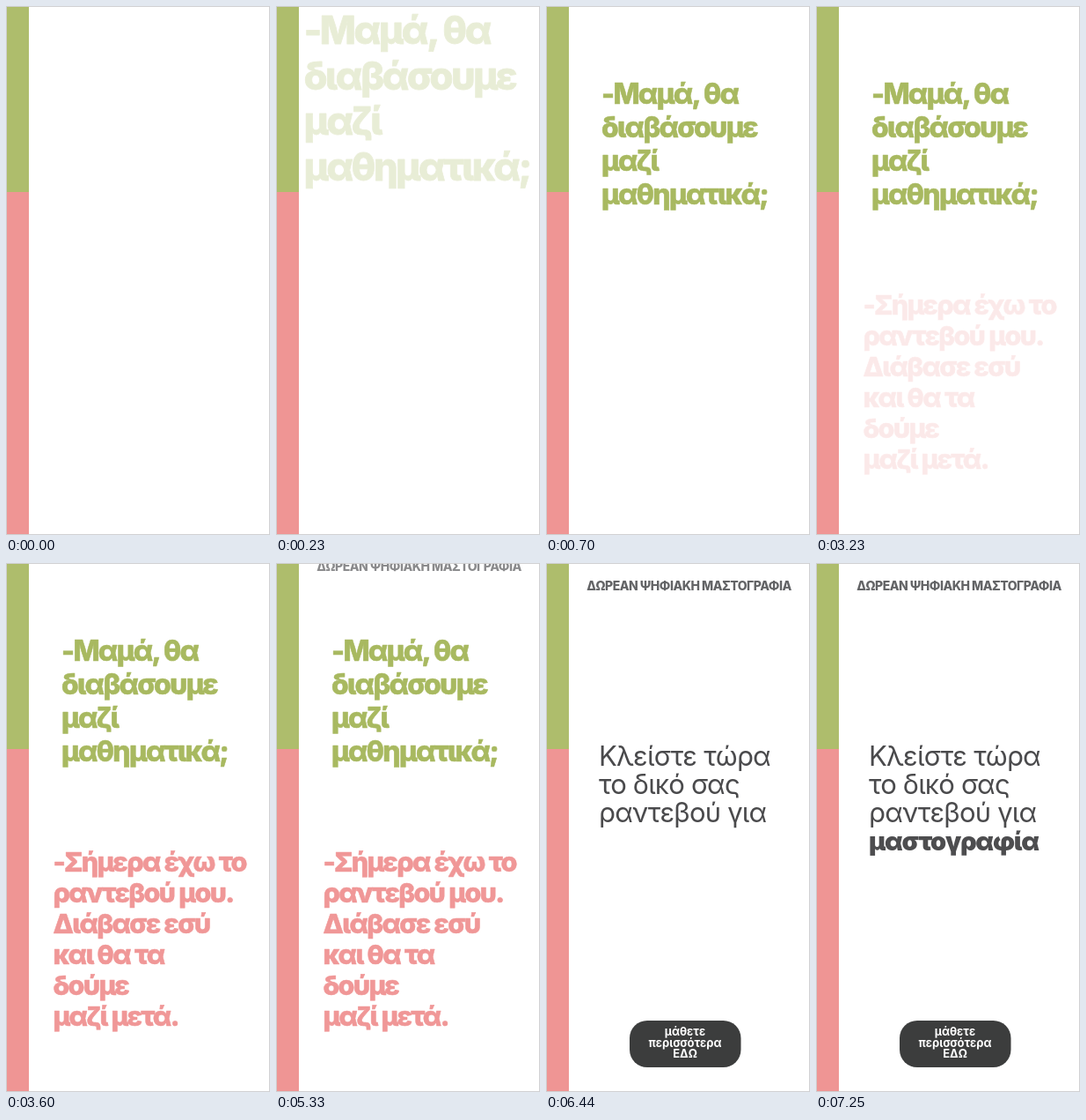
An HTML page that plays this animation: 300 by 600 pixels, repeating every 8000 ms.

```html
<!DOCTYPE html>
<html lang="el">
<head>
<meta charset="utf-8">
<title>Ψηφιακή μαστογραφία</title>
<style>
  html, body { margin: 0; width: 100%; height: 100%; overflow: hidden; background: #fff; }
  svg { display: block; width: 300px; height: 600px; font-family: Inter, "Open Sans", sans-serif; }
  #question, #answer { font-weight: 800; stroke-width: .6px; stroke-linejoin: round; }
  #question { font-size: 32px; letter-spacing: -1.7px; fill: #a8b960; stroke: #a8b960; }
  #answer { font-size: 30.5px; letter-spacing: -1.65px; fill: #f09797; stroke: #f09797; }
  #title { font-size: 14px; font-weight: 800; letter-spacing: -.5px; fill: #636466; text-anchor: middle; }
  #button text { font-size: 13px; font-weight: 700; fill: #fff; text-anchor: middle; }
  .light { font-size: 31px; font-weight: 400; letter-spacing: -.8px; fill: #4a4a4c; }
  .heavy { font-size: 29px; font-weight: 900; letter-spacing: -1.3px; fill: #4d4d4f; }
</style>
</head>
<body>
<svg viewBox="0 0 300 600">
  <rect width="300" height="600" fill="#fff"/>
  <rect width="26" height="211" fill="#aebd6c"/>
  <rect y="211" width="26" height="389" fill="#ef9594"/>

  <g id="question">
    <text x="63" y="111">-Μαμά, θα</text>
    <text x="63" y="149">διαβάσουμε</text>
    <text x="63" y="187">μαζί</text>
    <text x="63" y="225">μαθηματικά;</text>
  </g>

  <g id="answer">
    <text x="53.5" y="350">-Σήμερα έχω το</text>
    <text x="53.5" y="385">ραντεβού μου.</text>
    <text x="53.5" y="420">Διάβασε εσύ</text>
    <text x="53.5" y="455">και θα τα</text>
    <text x="53.5" y="490">δούμε</text>
    <text x="53.5" y="525">μαζί μετά.</text>
  </g>

  <text id="title" x="162.5" y="31">ΔΩΡΕΑΝ ΨΗΦΙΑΚΗ ΜΑΣΤΟΓΡΑΦΙΑ</text>

  <text id="line1" class="light" x="60" y="229.5">Κλείστε τώρα</text>
  <text id="line2" class="light" x="60" y="262">το δικό σας</text>
  <text id="line3" class="light" x="60" y="294">ραντεβού για</text>
  <text id="line4" class="heavy" x="60" y="326">μαστογραφία</text>

  <g id="button">
    <rect x="95" y="519" width="126.5" height="53" rx="20" fill="#3c3d3d"/>
    <text x="158" y="536">μάθετε</text>
    <text x="158" y="548.7">περισσότερα</text>
    <text x="158" y="561">ΕΔΩ</text>
  </g>

  <rect x=".5" y=".5" width="299" height="599" fill="none" stroke="#d0d0d2"/>
</svg>
<script>
  const LOOP = 8000;
  const byId = id => document.getElementById(id);

  // Progress 0..1 in `count` jumps: the first at `first`, the last at `last`.
  function stepped(time, first, last, count) {
    if (time < first) return 0;
    const interval = (last - first) / (count - 1);
    return Math.min(1, (Math.floor((time - first) / interval + 0.2) + 1) / count);
  }

  function show(id, opacity, transform = '') {
    const node = byId(id);
    node.setAttribute('opacity', opacity);
    node.setAttribute('transform', transform);
  }

  function draw(time) {
    const leave = 1 - stepped(time, 5410, 5660, 4);

    const zoomIn = stepped(time, 100, 700, 8);
    const scale = 1 + 0.48 * (1 - zoomIn);
    show('question', zoomIn * leave, `translate(150 300) scale(${scale}) translate(-150 -300)`);
    show('answer', stepped(time, 3230, 3600, 5) * leave);

    const drop = stepped(time, 5330, 5600, 4);
    show('title', Math.min(1, 3 * drop), `translate(0 ${-40 * (1 - drop) ** 2})`);
    show('button', stepped(time, 5410, 5660, 4));

    show('line1', stepped(time, 5740, 5920, 3));
    show('line2', stepped(time, 5940, 6110, 3));
    show('line3', stepped(time, 6240, 6440, 3));
    show('line4', stepped(time, 6610, 6980, 5));
  }

  const start = performance.now();
  function tick() {
    draw((performance.now() - start) % LOOP);
    requestAnimationFrame(tick);
  }
  draw(0);
  requestAnimationFrame(tick);
</script>
</body>
</html>
```
